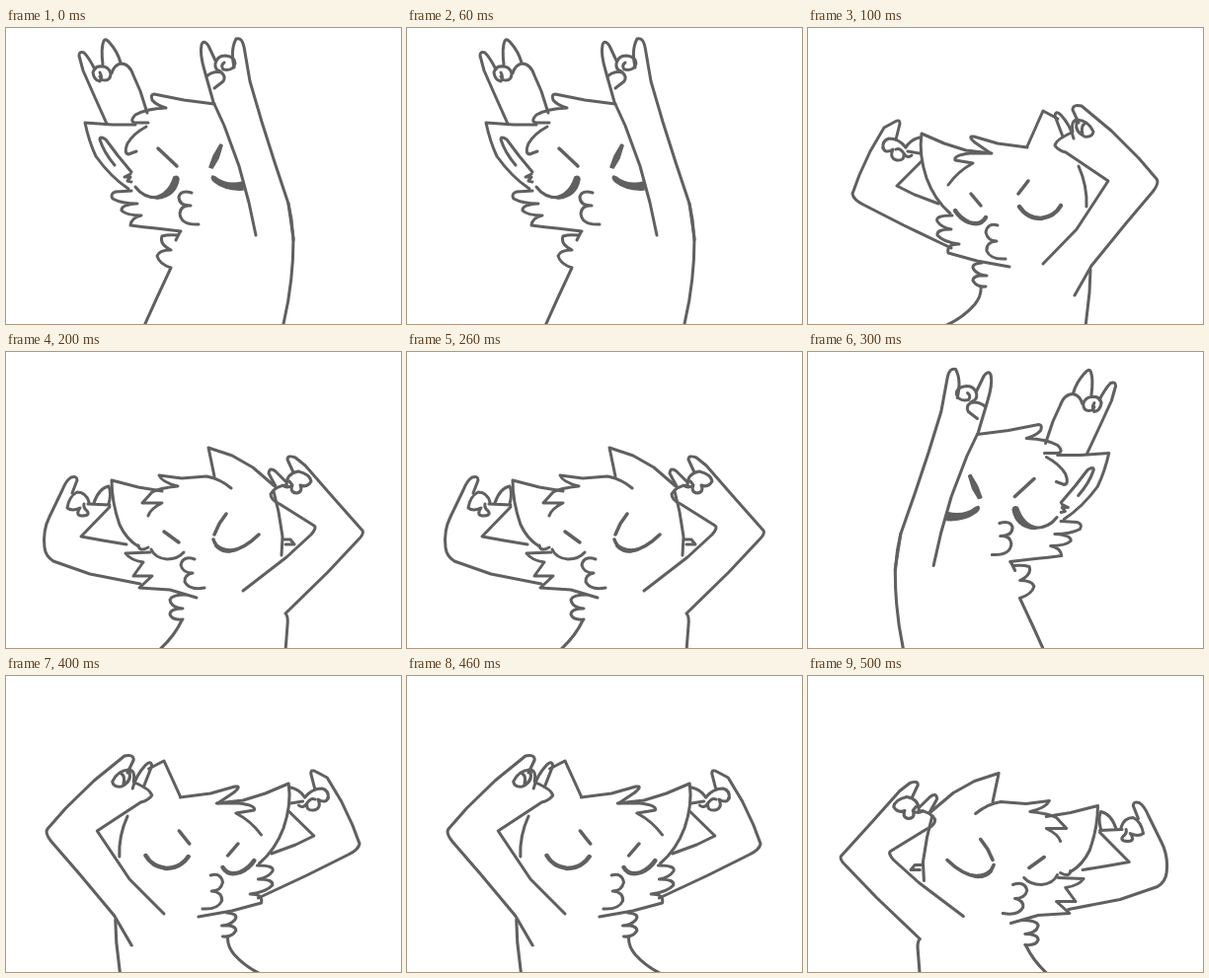
Animation of 400x300 px, one loop 0.6 s. Source, as an HTML page:

```html
<!DOCTYPE html>
<html lang="en">
<head>
<meta charset="utf-8">
<title>Dancing cat</title>
<style>
  html, body { margin: 0; width: 100%; height: 100%; overflow: hidden; background: #fff; }
  .stage { position: relative; width: 400px; height: 300px; overflow: hidden; }
  .strip {
    position: absolute; left: 0; top: 0; display: block;
    animation: flip 600ms steps(6) infinite;
  }
  @keyframes flip { to { transform: translateX(-2400px); } }
  path {
    fill: none; stroke: #606060; stroke-width: 3;
    stroke-linecap: round; stroke-linejoin: round;
  }
  .brow { stroke-width: 3.5; }
  .bold { stroke-width: 4.4; }
  .lash { fill: #606060; stroke-width: 1.6; }
</style>
</head>
<body>
<div class="stage">
<svg class="strip" width="2400" height="300" viewBox="0 0 2400 300">
  <defs>
    <!-- arms up -->
    <g id="up">
      <!-- far hand -->
      <path d="M102 97L89 68L78 43L74 28Q74 23 79 25Q84 30 90 42"/>
      <path d="M98 37Q96 20 99 13Q101 10 105 15Q113 24 116 35"/>
      <path d="M97 39Q90 38 88 45Q89 53 95 54Q98 50 95 45M97 39Q104 39 106 46Q106 53 100 53Q96 53 95 49"/>
      <path d="M107 46Q109 38 116 36Q125 36 129 48L136 64L143 86"/>
      <!-- hair and ear -->
      <path d="M211 77L180 73L150 67Q146 67 148 73Q152 78 162 81Q141 82 131 88Q125 94 130 96L144 96"/>
      <path d="M142 100Q129 107 123 117Q119 127 124 128L132 125"/>
      <path d="M131 98L108 98L80 96Q84 115 91 130Q106 151 124 163"/>
      <path d="M127 146L113 129L101 113Q95 109 95 113Q99 126 110 139"/>
      <path d="M126 148L120 151L126 151L123 155L127 156"/>
      <!-- cheek -->
      <path d="M127 165L111 166Q105 168 108 173Q117 178 133 178Q116 179 117 185Q122 190 137 190Q127 192 126 200Q140 202 152 203L177 206"/>
      <!-- face -->
      <path class="brow" d="M154 122L173 140"/>
      <path d="M131 161Q139 172 153 172Q168 169 173 154" stroke-width="3.6"/>
      <path class="lash" d="M150 171Q164 169 170 151Q174 149 175 153Q172 171 153 173Z"/>
      <path class="lash" d="M217 118L219 119L215 132L209 142L206 141L210 130Z"/>
      <path class="lash" d="M209 150Q207 152 211 156Q222 165 240 164L240 156Q223 160 212 151Z"/>
      <path d="M188 167Q177 164 175 171Q175 180 187 180Q177 179 176 188Q177 200 195 199"/>
      <!-- neck and body -->
      <path d="M176 207L172 215"/>
      <path d="M174 210Q164 209 158 211Q155 219 167 225Q155 225 153 231Q155 239 167 243L153 273L139 304"/>
      <!-- near arm -->
      <path d="M253 210L246 177L236 140L221 99L210 75L201 43Q196 26 198 17Q200 11 205 18L212 33"/>
      <path d="M231 40Q227 22 233 11Q239 9 241 19L247 54L259 95L272 136L286 178L291 213Q291 260 280 304"/>
      <path d="M286 178L289 194L291 215" stroke-width="4"/>
      <path d="M217 44Q211 42 212 36Q214 28 222 28Q232 29 232 36Q230 44 220 42Q217 38 221 35"/>
      <path d="M203 49Q210 43 218 45Q223 49 220 54L211 61"/>
    </g>

    <!-- elbows out -->
    <g id="out">
      <!-- far arm -->
      <path d="M89 113L93 97Q93 92 88 95L77 101L63 125L52 149L45 168Q46 174 56 179L97 200L145 223"/>
      <path d="M76 122Q75 114 82 112Q92 112 99 121"/>
      <path d="M76 121Q78 128 86 123Q82 132 90 134Q98 135 97 127Q93 121 89 123M97 127Q101 133 105 129"/>
      <path d="M99 121Q104 113 113 111M101 125L113 127"/>
      <!-- ears -->
      <path d="M115 135L90 160L108 169L132 178"/>
      <path d="M186 127L160 124L138 117L115 107Q112 128 120 152Q128 174 144 188"/>
      <path d="M222 121L192 117L168 110Q161 109 169 116L185 127L164 127Q147 129 149 134L167 137Q152 145 142 159"/>
      <path d="M222 120L238 84L253 92"/>
      <path d="M274 140Q283 160 282 181"/>
      <!-- cheek -->
      <path d="M146 190Q128 190 131 196Q135 202 145 204Q130 204 131 210Q137 217 153 219Q140 219 142 228L171 236L204 242"/>
      <!-- face -->
      <path class="brow" d="M165 168L175 180M223 155L213 168"/>
      <path class="bold" d="M149 185Q154 193 163 197Q175 201 180 192"/>
      <path class="bold" d="M214 181Q222 193 236 193Q250 191 256 180"/>
      <path d="M192 200Q182 197 180 207Q182 216 191 216Q180 217 181 226Q185 235 200 234"/>
      <!-- neck and body -->
      <path d="M176 238Q164 239 168 245Q173 251 181 251Q167 250 167 256Q171 263 180 262"/>
      <path d="M175 262Q176 271 169 280Q156 295 136 303"/>
      <path d="M286 245L285 268L281 303"/>
      <!-- near arm -->
      <path d="M267 106Q251 113 250 119Q253 124 261 126L304 155L272 204L238 239"/>
      <path d="M274 96L268 83Q268 77 277 79L307 104L335 132L353 153Q356 157 349 166L322 198L287 241L270 271"/>
      <path d="M258 110L250 89Q251 83 256 88Q266 99 269 112"/>
      <path d="M268 105Q266 93 273 93Q284 94 289 105Q288 111 280 110Q270 105 272 96M278 107Q276 100 280 97"/>
    </g>

    <!-- elbows low -->
    <g id="low">
      <!-- far arm -->
      <path d="M67 143L72 130Q72 125 66 127Q61 130 57 140L44 167Q37 181 39 198Q40 207 48 212L85 225L136 235"/>
      <path d="M84 152Q81 142 72 142Q64 146 62 158Q67 162 75 158Q70 165 76 166Q86 166 82 161Q78 158 79 154"/>
      <path d="M89 153Q94 138 104 136Q107 143 104 154M83 154L105 155"/>
      <!-- ears -->
      <path d="M105 157L76 187L98 191L122 195"/>
      <path d="M158 141L134 137L107 130Q107 152 115 175Q122 190 134 197"/>
      <path d="M228 138Q216 128 203 126L178 128L155 125Q158 132 174 136Q155 138 148 142L138 153L158 153Q146 159 144 166"/>
      <path d="M211 126L205 97L229 105L250 117L272 136"/>
      <path d="M271 141L276 162L280 187L279 206"/>
      <path d="M281 190L288 190L292 195L283 195"/>
      <!-- cheek -->
      <path d="M134 196Q135 203 144 198M146 203L121 204Q126 211 139 213L129 227L148 227L135 239L166 241L193 249"/>
      <!-- face -->
      <path class="brow" d="M160 182L175 193"/>
      <path d="M147 200Q151 209 163 210Q174 210 180 203" stroke-width="3.8"/>
      <path class="brow" d="M223 164L216 174L211 185"/>
      <path class="brow" d="M210 190Q214 202 226 202Q241 200 256 185"/>
      <path class="lash" d="M211 192Q219 204 239 198Q222 208 212 197Z"/>
      <path d="M191 210Q179 206 177 216Q179 224 189 224Q180 226 181 233Q186 242 201 239"/>
      <!-- neck and body -->
      <path d="M182 246Q168 246 166 251Q167 259 179 260Q166 260 166 266Q168 272 179 271"/>
      <path d="M178 272Q170 289 154 303"/>
      <!-- near arm -->
      <path d="M284 135Q272 136 268 144Q268 150 277 154L312 176Q315 178 309 185L284 208L240 242"/>
      <path d="M291 122L285 109Q285 104 293 107L303 115L330 146L361 181Q363 184 356 191L326 223L283 265Q286 268 285 277L283 303"/>
      <path d="M273 136L266 123Q267 116 273 121L283 131"/>
      <path d="M284 135Q284 123 296 121Q308 124 309 131Q305 138 298 135Q301 142 294 143Q287 142 290 135Q284 139 280 135M290 135L287 131"/>
    </g>
  </defs>

  <svg x="0" width="400" height="300"><use href="#up"/></svg>
  <svg x="400" width="400" height="300"><use href="#out"/></svg>
  <svg x="800" width="400" height="300"><use href="#low"/></svg>
  <svg x="1200" width="400" height="300"><use href="#up" transform="matrix(-1.02 0 -.01 1 387.3 6.5)"/></svg>
  <svg x="1600" width="400" height="300"><use href="#out" transform="matrix(-1.026 0 0 1 404.2 2)"/></svg>
  <svg x="2000" width="400" height="300"><use href="#low" transform="matrix(-1.0235 0 0 1 403 1.5)"/></svg>
</svg>
</div>
</body>
</html>
```
